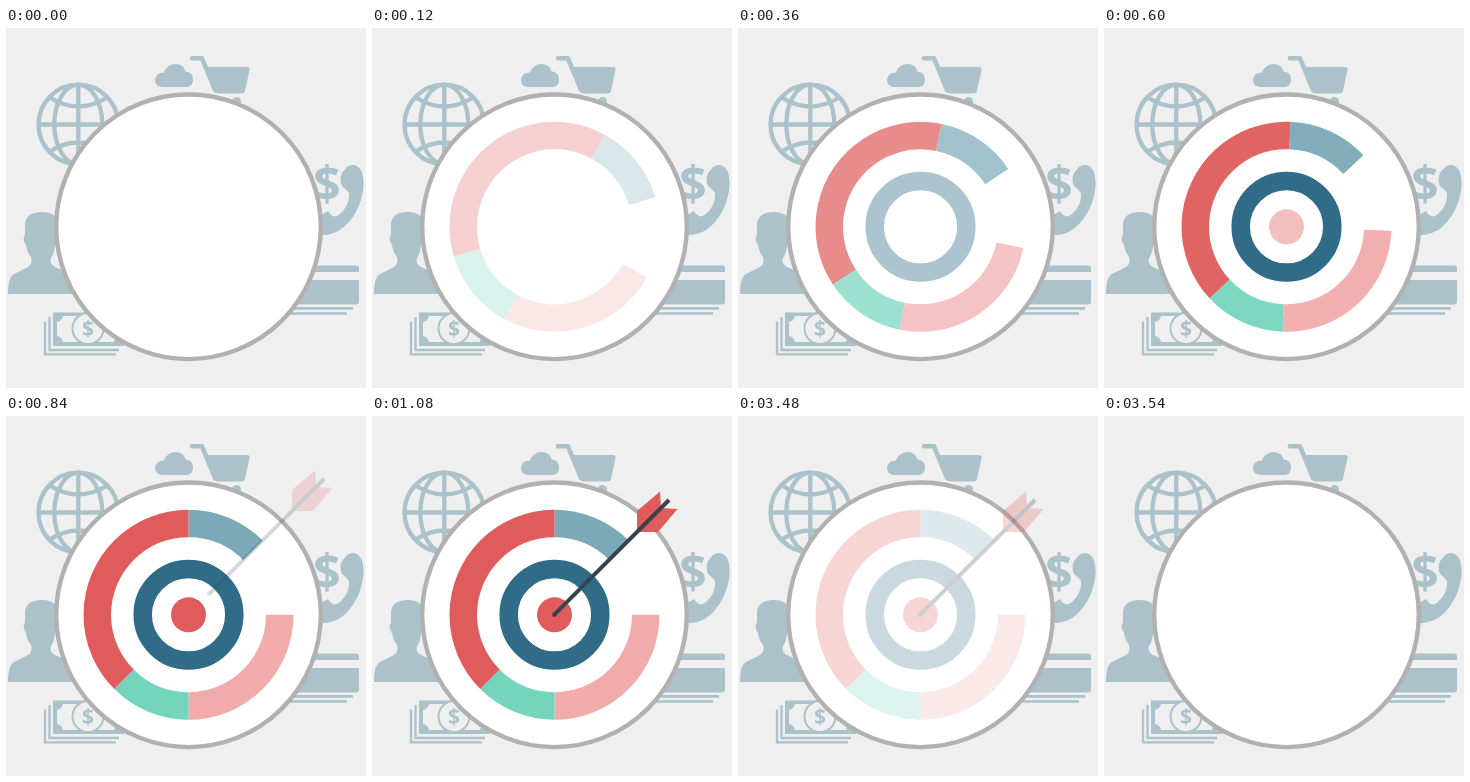
Write an HTML page that moves like this. It is 360 px wide and 360 px high and loops after 3.6 s.

```html
<!DOCTYPE html>
<html lang="en">
<head>
<meta charset="utf-8">
<title>Target</title>
<style>
html, body { margin: 0; width: 100%; height: 100%; overflow: hidden; background: #efefef; }
svg { display: block; width: 100vw; height: 100vh; }
text { font-family: "Open Sans", sans-serif; font-weight: 700; text-anchor: middle; }
</style>
</head>
<body>
<svg viewBox="0 0 360 360">
  <g id="icons" fill="#abc2cb" stroke="none">
    <g id="globe" fill="none" stroke="#abc2cb" stroke-width="4.3">
      <circle cx="72.3" cy="96.5" r="39.8"/>
      <ellipse cx="72.3" cy="96.5" rx="24" ry="39.8"/>
      <path d="M72.3 56V137M32 96.5H113M43 69Q72 88 102 69M43 124Q72 105 102 124"/>
    </g>
    <path id="cloud" d="M156 59Q149 58.500 149 51.500Q150 44.500 158 44.500Q161 36 170 36Q178 36.500 179.500 43.500Q187 44 187 51.500Q187 58 181 59Z"/>
    <g id="cart">
      <path d="M186 30.300H196L209 62" fill="none" stroke="#abc2cb" stroke-width="4.600" stroke-linecap="round" stroke-linejoin="round"/>
      <path d="M201 39H241Q244 39 243.500 42L239 63Q238.400 65.500 235 65.500H212Q209 65.500 208 62.500Z"/>
      <circle cx="230.500" cy="73.500" r="4.500"/>
    </g>
    <text x="321" y="172.500" font-size="48">$</text>
    <path id="phone" d="M341 139Q349 134 355 142C364 160 349 206 318 207H310V190L322 183Q327 192 334 186Q344 177 343 165Q341 162 336 158Q333 151 336 145Z"/>
    <path id="card" d="M280 244V237.500H350Q353 237.500 353 240V244ZM280 252H353V273.500Q353 276.500 350 276.500H280ZM280 279H347V281.800H280ZM280 284.300H341V286.800H280Z"/>
    <path id="person" d="M2 266Q2 249 8 246L22 239Q27 236 25 229Q21 224 20 217Q16 212 19 206V195Q21 184 36 184Q48 184 51 192V206Q53 213 49 218Q48 226 45 230Q43 236 49 239L70 248V266Z"/>
    <g id="money">
      <path d="M43.500 289V322H113M39 293.500V326.300H110" fill="none" stroke="#abc2cb" stroke-width="2.300"/>
      <path d="M47 284.500H118V318H47Z"/>
      <path d="M57 288H108Q109 293 114 294V308Q109 309 108 314H57Q56 309 51 308V294Q56 293 57 288Z" fill="#efefef"/>
      <circle cx="82" cy="300.500" r="15.500" fill="#efefef" stroke="#abc2cb" stroke-width="2"/>
      <text x="82" y="308" font-size="21">$</text>
    </g>
  </g>
  <circle cx="182.500" cy="198.800" r="132.300" fill="#fff" stroke="#b1b1b1" stroke-width="4.400"/>
  <g id="all">
    <g id="chart" fill="none" stroke-width="27.500"></g>
    <circle id="ring" cx="182.500" cy="198.800" r="45.800" fill="none" stroke="#306c88" stroke-width="18.500"/>
    <circle id="dot" cx="182.500" cy="198.800" r="17.500" fill="#e05c5c"/>
    <g id="arrow">
      <path d="M265 95L288 75.500L289 92L305.500 93L286 116H265Z" fill="#e05c5c"/>
      <path d="M182.300 198.700L297 84" stroke="#37444f" stroke-width="4" fill="none"/>
      <circle cx="182.300" cy="198.700" r="2.200" fill="#37444f"/>
    </g>
  </g>
</svg>
<script>
const LOOP = 3600, STEP = 60;
const CX = 182.5, CY = 198.8;
const el = id => document.getElementById(id);
const [all, chart, ring, dot, arrow] = ["all", "chart", "ring", "dot", "arrow"].map(el);

// start angle, sweep (degrees clockwise from the top), colour
const slices = [[0, 45, "#7ba9b8"], [90, 90, "#f2abab"], [180, 45, "#74d5bc"], [225, 135, "#e05c5c"]];
chart.innerHTML = slices.map(([start, sweep, colour]) =>
  `<circle cx="${CX}" cy="${CY}" r="91.25" pathLength="360" stroke="${colour}"
    stroke-dasharray="${sweep} 360" transform="rotate(${start - 90} ${CX} ${CY})"/>`).join("");

const progress = (t, start, length) => Math.min(1, Math.max(0, (t - start) / length));
const easeOut = p => 1 - (1 - p) ** 2;
const fade = (node, value) => node.setAttribute("opacity", value);

function draw(t) {
  const turn = easeOut(progress(t, 0, 780));
  fade(chart, turn);
  chart.setAttribute("transform", `rotate(${40 * (1 - turn)} ${CX} ${CY})`);

  fade(ring, progress(t, 240, 300));
  fade(dot, progress(t, 480, 300));

  const flight = progress(t, 780, 300);
  const gap = 33 * (1 - easeOut(flight));
  fade(arrow, flight);
  arrow.setAttribute("transform", `translate(${gap} ${-gap})`);

  fade(all, 1 - progress(t, 3300, 240));
}

const begin = performance.now();
function tick() {
  const t = (performance.now() - begin) % LOOP;
  draw(Math.floor(t / STEP) * STEP);
  requestAnimationFrame(tick);
}
tick();
</script>
</body>
</html>
```
